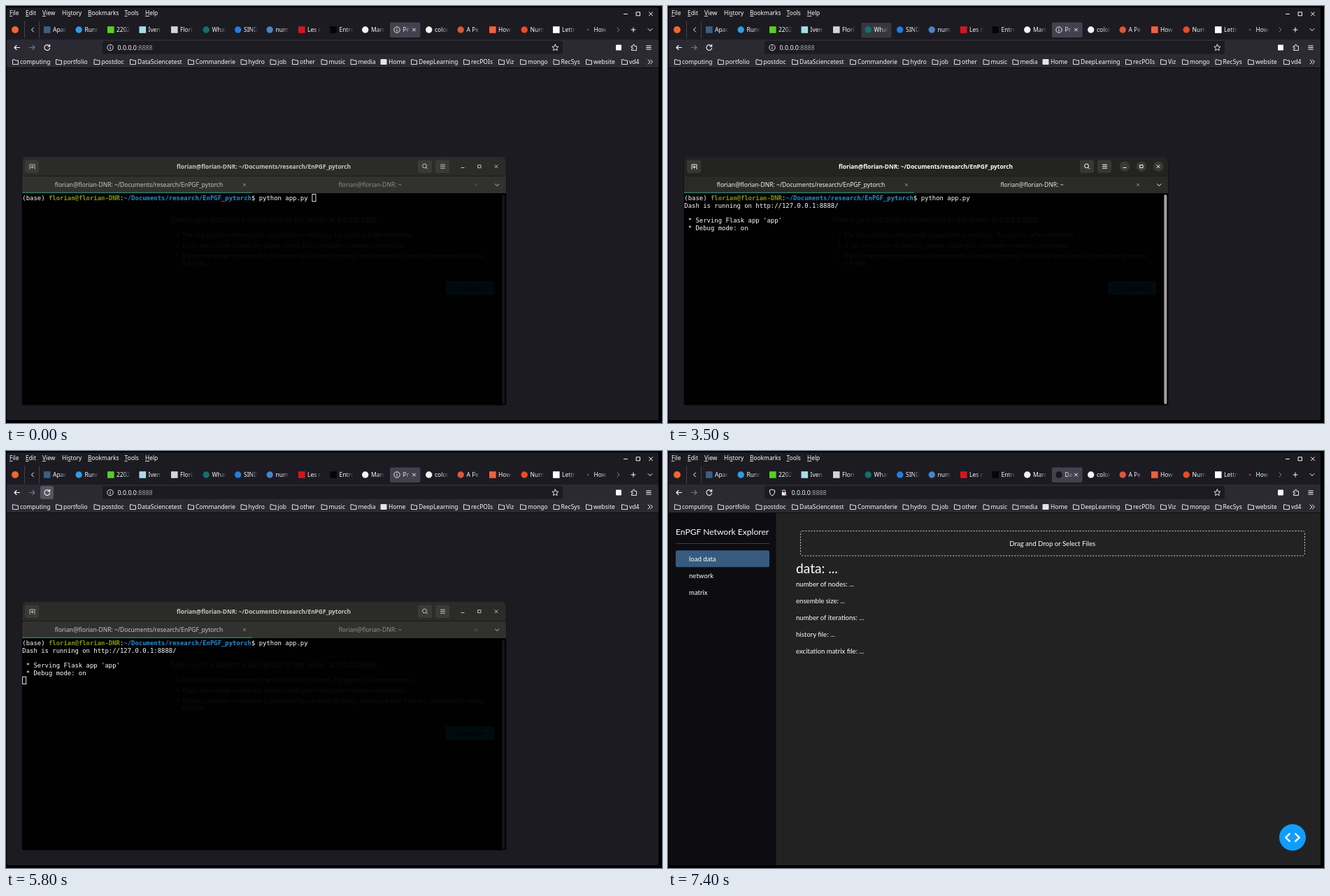
An HTML page that plays this animation: 938x597 px, repeating every 8 s.

```html
<!DOCTYPE html>
<html lang="en">
<head>
<meta charset="utf-8">
<title>Starting the app</title>
<style>
html, body { margin: 0; height: 100%; overflow: hidden; background: #000; }
svg { display: block; width: 100vw; height: 100vh; }
text { font-family: "Noto Sans", "Open Sans", sans-serif; white-space: pre; }
.mono { font-family: "DejaVu Sans Mono", monospace; }
.lato text { font-family: Lato, sans-serif; }
.light { font-family: "Open Sans", sans-serif; font-weight: 300; }
.mid { text-anchor: middle; }
.bold { font-weight: 700; }
</style>
</head>
<body>
<svg id="stage" viewBox="0 0 938 597"></svg>
<script>
const INK = '#fbfbfe', USER = 'florian@florian-DNR', DIR = '~/Documents/research/EnPGF_pytorch';

const text = (x, y, s, size = 8.5, fill = INK, cls = '') =>
  `<text x="${x}" y="${y}" font-size="${size}" fill="${fill}" class="${cls}">${s}</text>`;
const box = (x, y, w, h, fill, r = 0, more = '') =>
  `<rect x="${x}" y="${y}" width="${w}" height="${h}" rx="${r}" fill="${fill}" ${more}/>`;
const dot = (x, y, r, fill, more = '') => `<circle cx="${x}" cy="${y}" r="${r}" fill="${fill}" ${more}/>`;
const line = (d, color = INK, w = 1) =>
  `<path d="${d}" fill="none" stroke="${color}" stroke-width="${w}" stroke-linecap="round" stroke-linejoin="round"/>`;
const group = (id, s, more = '') => `<g id="${id}" ${more}>${s}</g>`;
const cross = (x, y, r, color, w) => line(`M${x - r} ${y - r}l${2 * r} ${2 * r}m0 ${-2 * r}l${-2 * r} ${2 * r}`, color, w);
const burger = (x, y, w, color) => line([-2.5, 0, 2.5].map(d => `M${x - w / 2} ${y + d}h${w}`).join(''), color);
const info = (x, y) => dot(x, y, 4.2, 'none', `stroke="${INK}" stroke-width=".9"`) +
  line(`M${x} ${y - .3}v2.2M${x} ${y - 2.1}v.1`);

// Browser tabs: label, icon colour, round icon
const TAB0 = 49, STEP = 45.5, ACTIVE = 11;
const tabs = [
  ['Apac', '#3b5e84'], ['Runn', '#2f9be8', 1], ['2202', '#58cf22'], ['Iven', '#a9dcea'],
  ['Flori', '#d5d5d5'], ['What', '#14706c', 1], ['SIND', '#1f7fe0', 1], ['num', '#4a83c8', 1],
  ['Les n', '#d9141e'], ['Entre', '#050506'], ['Marc', '#f4f4f6', 1], null,
  ['color', '#f4f4f6', 1], ['A Pe', '#e0563a', 1], ['How', '#f2603a'], ['Num', '#ef4a23', 1],
  ['Lettr', '#ffffff'], ['How', '#b5401a', 1]];
const tabX = i => TAB0 + i * STEP;
const tabLabel = s => text(18, 37.3, s, 8.5, 'url(#fade)');

function tab(item, i) {
  if (!item) return '';
  const [label, color, round] = item;
  const icon = round ? dot(9.7, 34, i == 17 ? 1.3 : 4.7, color) : box(5, 29.2, 9.6, 9.6, color);
  return `<g transform="translate(${tabX(i)})">${icon}${tabLabel(label)}</g>`;
}

const menus = [[5, '<u>F</u>ile'], [28, '<u>E</u>dit'], [52, '<u>V</u>iew'], [80, 'Hi<u>s</u>tory'],
  [117, '<u>B</u>ookmarks'], [169.5, '<u>T</u>ools'], [199, '<u>H</u>elp']];
const underline = s => s.replace(/<u>(.)<\/u>/, '<tspan text-decoration="underline">$1</tspan>');

const marks = [[20, 'computing'], [82, 'portfolio'], [136.5, 'postdoc'], [188, 'DataSciencetest'],
  [271, 'Commanderie'], [346.5, 'hydro'], [388.5, 'job'], [420, 'other'], [461.5, 'music'],
  [503.5, 'media'], [547, 'Home'], [590, 'DeepLearning'], [665, 'recPOIs'], [715, 'Viz'],
  [746, 'mongo'], [793.5, 'RecSys'], [840, 'website'], [891, 'vd4']];
const mark = ([x, s]) => text(x, 83, s) + (s == 'Home'
  ? box(x - 11.5, 76, 9, 8, '#e4e4e8', 1)
  : line(`M${x - 10.5} 83.2v-6.4h3l1 1.2h4v5.2z`, INK, .9));

function browser() {
  return box(1, 2, 932, 591, '#1c1b22', 3) + box(1, 48, 932, 40.5, '#2b2a33') +
    box(1, 88, 932, 1, '#0c0c0d') +
    group('viewHover', box(48, 2, 28, 17, '#3c3b44', 2)) +
    menus.map(([x, s]) => text(x, 13.2, underline(s), 8.4)).join('') +
    line('M883.5 11.5h5') + line('M901.5 8.8h5v5h-5z') + cross(922, 11.3, 2.5) +
    dot(13, 34, 5, '#f0662f') + line('M26.5 22V46', '#42414d') + line('M47.5 22V46', '#42414d') +
    line('M39.5 31l-3 3 3 3') +
    box(0, 24, 43, 21.5, '#38373f', 2, 'id="tabHover"') +
    tabs.map(tab).join('') +
    `<g transform="translate(${tabX(ACTIVE)})">` + box(-.5, 23.5, 43.5, 21.5, '#42414d', 2) +
    group('tabInfo', info(9.5, 34)) +
    group('tabSpin', dot(9.5, 34, 2.2, '#4aa8f0')) +
    group('tabDash', dot(9.5, 34, 4.7, '#18181c')) +
    `<g id="tabOld">${text(18, 37.3, 'Pr', 8.5, 'url(#fadeShort)')}</g>` +
    `<g id="tabNew">${text(18, 37.3, 'Da', 8.5, 'url(#fadeShort)')}</g>` +
    cross(34, 34, 2) + '</g>' +
    line('M874 31l3 3-3 3', '#85848c') + line('M894 34h6m-3-3v6') + line('M918 32.5l3 3 3-3') +
    line('M19.5 59.5h-7.5m3-3l-3 3 3 3', INK, 1.1) + line('M33.5 59.5h7.5m-3-3l3 3-3 3', '#77767f', 1.1) +
    group('reloadHover', box(49, 50, 19, 19, '#55545f', 2.5)) +
    group('reload', line('M62 57.2a3.9 3.9 0 1 0 .7 3M62.7 55.2v2.8h-2.8', INK, 1.1)) +
    group('stop', cross(58.5, 59.5, 3.2, INK, 1.1)) +
    box(138, 50, 658, 18.7, '#1c1b22', 2.5) +
    group('urlOld', info(149, 59.5) + url(159.5)) +
    group('urlNew', line('M149 55.2l3.7 1.3c0 4-1 6-3.7 7.6c-2.7-1.6-3.7-3.6-3.7-7.6z') +
      box(162.8, 59, 6, 4.5, INK, .8) + line('M164 59v-1.5a1.8 1.8 0 0 1 3.6 0v1.5') +
      line('M161.8 55.5l8 8', '#e8455a') + url(176.5)) +
    line('M785.4 55l1.3 2.9 3.2.4-2.4 2.1.7 3.2-2.8-1.6-2.8 1.6.7-3.2-2.4-2.1 3.2-.4z', INK, .9) +
    box(872, 55.5, 8, 8, INK, 1) +
    line('M894.5 57.5h2v-1.2a1.2 1.2 0 0 1 2.4 0v1.2h2.6v6h-7v-2h1a1 1 0 0 0 0-2h-1z', INK, .9) +
    burger(919, 59.5, 6.5, INK) +
    group('markHover', box(68, 72, 52, 16, '#4a4953', 2)) +
    marks.map(mark).join('') + line('M918 77l3 3-3 3m3.5-6l3 3-3 3');
}
const url = x => text(x, 62.8, '0.0.0.0<tspan fill="#a3a2aa">:8888</tspan>', 8.9);

function errorPage() {
  const items = [[331, 'The site could be temporarily unavailable or too busy. Try again in a few moments.'],
    [346, 'If you are unable to load any pages, check your computer’s network connection.'],
    [360.5, 'If your computer or network is protected by a firewall or proxy, make sure that Tilvera is permitted to access']];
  return text(234, 282, 'Unable to connect', 15.7, INK, 'light') +
    text(234, 310, 'Tilvera can’t establish a connection to the server at 0.0.0.0:8888.', 10) +
    items.map(([y, s]) => dot(245.5, y - 2.8, 1.4, INK) + text(252, y, s, 8.55)).join('') +
    text(252, 370.7, 'the web.', 8.55) +
    box(629, 394, 69, 19.5, '#00ddff', 2) + text(663.5, 407.3, 'Try Again', 8.5, '#2b2a33', 'mid bold');
}

function dashPage() {
  const stats = ['number of nodes', 'ensemble size', 'number of iterations', 'history file', 'excitation matrix file'];
  return box(1, 89, 932, 504, '#222222') +
    group('loading', text(4, 103, 'Loading...', 9.6, '#fff')) +
    group('layout', box(1, 89, 153.5, 504, '#0c0c11') +
      text(11, 120, 'EnPGF Network Explorer', 12.1, '#fff') + box(11, 132, 134, 1, '#3c3c42') +
      box(11, 142.3, 134, 24, '#375a7f', 2.5) +
      ['load data', 'network', 'matrix'].map((s, i) => text(30, 157.8 + 24 * i, s, 9.6, '#fff')).join('') +
      box(189.5, 114.5, 721, 35.5, 'none', 3, 'stroke="#e4e4e4" stroke-width=".9" stroke-dasharray="2 2"') +
      text(549.7, 136.2, 'Drag and Drop or Select Files', 9.6, '#fff', 'mid') +
      text(183, 175.3, 'data: ...', 19.2, '#fff') +
      stats.map((s, i) => text(183, 194.3 + 24 * i, s + ': ...', 9.6, '#fff')).join('') +
      dot(893, 553.3, 19, '#119dff') +
      line('M888.8 548l-5.5 5.3 5.5 5.3M897.2 548l5.5 5.3-5.5 5.3', '#fff', 2.4));
}

// Window decoration of the terminal, focused or not
function frame(on) {
  const ink = on ? '#ffffff' : '#c4c4c2', dim = on ? '#e6e6e6' : '#8c8c8a', button = on ? '#373736' : '#3a3a38';
  const name = USER + ': ' + DIR;
  return `<path d="M23 268V223a7 7 0 0 1 7-7H708a7 7 0 0 1 7 7V268z" fill="${on ? '#232322' : '#2b2b2a'}"/>` +
    box(23, 243.5, 692, 24.5, on ? '#2a2a29' : '#31312f') + box(23, 243, 692, 1, '#1b1b1a') +
    box(23, 266.6, 329, 1.4, '#2c7d6b') +
    [27, 589, 614].map(x => box(x, 220.5, 20, 18.5, button, 3)).join('') +
    line('M34 233.5v-6.5h7v6.5M37.5 228.5v4m-2-2h4', ink, .9) +
    dot(598.5, 229, 2.9, 'none', `stroke="${ink}"`) + line('M600.7 231.2l2 2', ink) + burger(624.5, 229.7, 6, ink) +
    (on ? [653, 677, 701].map(x => dot(x, 229.7, 7.2, '#393938')).join('') : '') +
    line('M651 231.5h4', ink) + line('M675 227.7h4v4h-4z', ink) + cross(701, 229.7, 2, ink) +
    text(368.5, 232.8, name, 8.35, ink, 'mid bold') +
    text(190, 259, name, 8.55, on ? '#f4f4f4' : '#c4c4c2', 'mid') +
    text(520.5, 259, USER + ': ~', 8.55, dim, 'mid') +
    cross(341, 256, 1.8, '#8e8e8c', .9) + cross(672, 256, 1.8, on ? '#8e8e8c' : '#5a5a58', .9) +
    line('M699.5 255l2.7 2.5 2.7-2.5', ink) +
    box(709.3, 270, 4, 300, on ? '#a0a09e' : '#141615', 2);
}

function terminal() {
  const row = (y, s) => text(23.3, y, s, 8.93, '#fff', 'mono');
  const bold = (s, c) => `<tspan class="bold" fill="${c}">${s}</tspan>`;
  return box(22, 217, 694, 355.5, '#000', 7, 'opacity=".35"') +
    box(23, 268, 692, 303, '#000', 0, 'fill-opacity=".92"') +
    frame(false) + group('focus', frame(true)) +
    row(278, `(base) ${bold(USER, '#859900')}:${bold(DIR, '#268bd2')}$ python app.py`) +
    group('output', row(288.8, 'Dash is running on http://127.0.0.1:8888/') +
      row(310.4, " * Serving Flask app 'app'") + row(321.2, ' * Debug mode: on')) +
    box(0, 0, 5, 10.4, '#fff', 0, 'id="cursor" stroke="#fff" stroke-width=".9"');
}

const fade = (id, a, b) => `<linearGradient id="${id}" gradientUnits="userSpaceOnUse" x1="${a}" x2="${b}">` +
  `<stop stop-color="${INK}"/><stop offset="1" stop-color="${INK}" stop-opacity="0"/></linearGradient>`;

const $ = id => document.getElementById(id);
$('stage').innerHTML = `<defs>${fade('fade', 27, 38)}${fade('fadeShort', 20, 31)}</defs>` +
  browser() + group('error', errorPage()) + group('dash', dashPage(), 'class="lato"') + group('term', terminal());

const show = (id, on) => $(id).style.display = on ? '' : 'none';
const within = (t, a, b) => t >= a && t < b;

// Start, end and tab index of each pointer hover
const hovers = [[3300, 3400, 13], [3400, 3500, 9], [3500, 3600, 5], [3600, 3700, 2], [4100, 4300, 0], [5700, 5800, 0]];

function draw(t) {
  const focused = within(t, 1100, 5100);
  const glow = focused ? Math.min(1, .75 + (t - 1100) / 800)
    : t >= 5100 ? Math.max(0, .4 - (t - 5100) / 750) : 0;
  $('focus').style.opacity = glow;
  show('term', t < 6300);
  show('output', t >= 2700);

  const blank = within(t, 1700, 2300) || within(t, 3000, 3600) || within(t, 4300, 4800);
  const [x, y] = t < 2500 ? [437.9, 269.4] : t < 2700 ? [23.7, 280.2] : [23.7, 323.2];
  const cursor = $('cursor');
  cursor.setAttribute('transform', `translate(${x} ${y})`);
  cursor.setAttribute('fill', focused ? '#fff' : 'none');
  show('cursor', !(focused && blank));

  const hover = hovers.find(([a, b]) => within(t, a, b));
  show('tabHover', hover);
  if (hover) $('tabHover').setAttribute('x', tabX(hover[2]));
  show('viewHover', within(t, 4000, 4100));
  show('reloadHover', within(t, 5800, 7000));
  show('markHover', within(t, 7100, 7200));

  const loading = within(t, 6400, 6900), loaded = t >= 6500;
  show('error', !loaded);
  show('dash', loaded);
  show('loading', t < 6800);
  show('layout', t >= 6800);
  show('urlOld', !loaded);
  show('urlNew', loaded);
  show('tabOld', !loaded);
  show('tabNew', loaded);
  show('tabInfo', t < 6400);
  show('tabSpin', loading);
  show('tabDash', t >= 6900);
  $('tabSpin').setAttribute('transform', `translate(${loading ? 2.5 * Math.sin(t / 130) : 0})`);
  show('stop', loading);
  show('reload', !loading);
  $('reload').style.opacity = within(t, 6900, 7400) ? .4 : 1;
}

function tick() {
  draw(Math.floor(performance.now() % 8000 / 100) * 100);
  requestAnimationFrame(tick);
}
tick();
</script>
</body>
</html>
```
